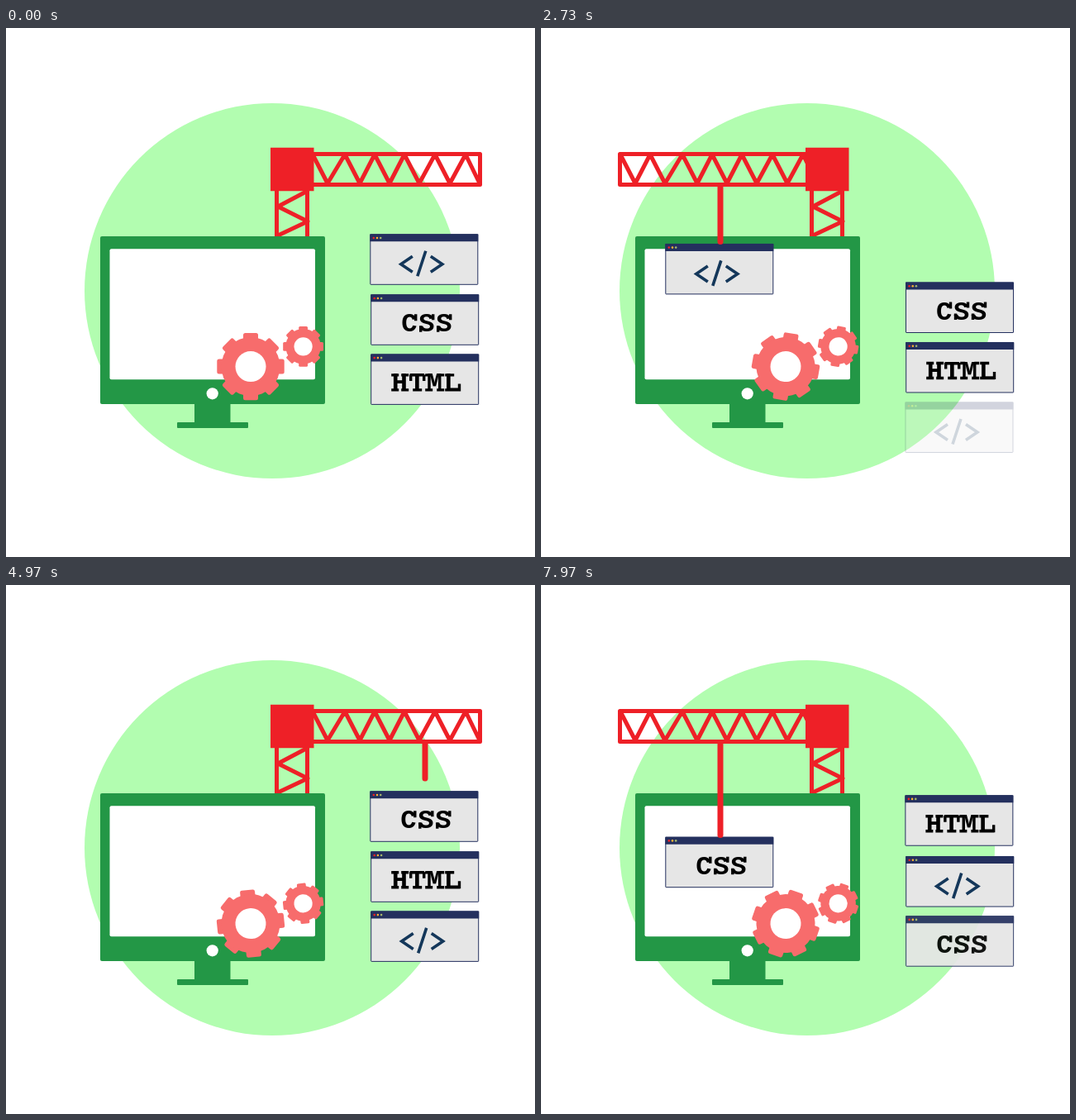
Recreate the animation shown at these times as an HTML page. Size 640 px wide and 640 px high, loop 8 s.

```html
<!DOCTYPE html>
<html lang="en">
<head>
<meta charset="utf-8">
<title>Website under construction</title>
<style>
  html, body { margin: 0; width: 100%; height: 100%; overflow: hidden; background: #fff; }
  svg { display: block; width: 100%; height: 100%; }
  text { font: bold 32px "Liberation Mono", monospace; letter-spacing: 1.8px; }
  .red { fill: none; stroke: #ee2027; stroke-width: 5; stroke-linejoin: round; }
  .serif { fill: none; stroke: #000; stroke-width: 3.4; }
</style>
</head>
<body>
<svg viewBox="0 0 640 640">
  <defs>
    <g id="window">
      <rect x=".5" y=".5" width="130" height="60.5" rx=".5" fill="#e6e6e6" stroke="#24305e"/>
      <path d="M0 0H131V9H0Z" fill="#24305e"/>
      <circle cx="4.5" cy="4.7" r="1.3" fill="#ee2027"/>
      <circle cx="8.7" cy="4.7" r="1.3" fill="#f9b233"/>
      <circle cx="12.9" cy="4.7" r="1.3" fill="#a5b86c"/>
    </g>
    <g id="code">
      <use href="#window"/>
      <path d="M51.5 27L37.5 36.5L51.5 46M67.5 20.5L57.5 51M73.5 27L87.5 36.5L73.5 46"
            fill="none" stroke="#14375a" stroke-width="3.6"/>
    </g>
    <g id="css">
      <use href="#window"/>
      <text x="37" y="45">CSS</text>
      <path class="serif" d="M54.5 24V32M75.5 24V31M60.5 38V45.5M96.5 24V31M81.5 38V45.5"/>
    </g>
    <g id="html">
      <use href="#window"/>
      <text x="25.5" y="45">HTML</text>
      <path class="serif" d="M25 25.5H34M37 25.5H46M25 43.5H34M37 43.5H46
        M48.5 25V32.5M64.5 25V32.5M51 43.5H62
        M66 25.5H72M83 25.5H89M66 43.5H75M80 43.5H89
        M90 25.5H101M90 43.5H108M107.3 36V45"/>
    </g>
    <g id="gear">
      <g id="teeth" fill="#f76c6c"></g>
      <circle r="35.5" fill="#f76c6c"/>
      <circle r="18.5" fill="#fff"/>
    </g>
  </defs>

  <circle cx="322" cy="318" r="227" fill="#b2fdb0"/>

  <path class="red" d="M327.5 195V252M364.5 195V252M365 197L329 216L365 234L329 251"/>
  <g id="jib" class="red"><path d="M334.5 152.5H573.5V189.5H334.5Z"/><path id="lattice"/></g>
  <path d="M320 144.7H372.5V197.2H320Z" fill="#ee2027"/>

  <g fill="#239746">
    <rect x="114" y="252" width="272" height="203" rx="2"/>
    <path d="M228 454H271.5V478H228Z"/>
    <rect x="207" y="477" width="86" height="7" rx="1"/>
  </g>
  <rect x="125.5" y="267.3" width="248.5" height="158" rx="2" fill="#fff"/>
  <circle cx="249.7" cy="442.3" r="7.1" fill="#fff"/>

  <g id="queue"><use/><use/><use/></g>
  <use id="carried"/>
  <line id="rope" class="red" y1="190.5" style="stroke-width:7;stroke-linecap:round"/>
  <use id="bigGear" href="#gear"/>
  <use id="smallGear" href="#gear"/>
</svg>
<script>
const LOOP = 8000, CYCLE = 4520, STEP = 40, GEAR_TURN = 6760;
const JIB_TRAVEL = 239, TROLLEY_TRAVEL = 51, HOOK_X = 507, JIB_Y = 190;
const CARDS = ['#code', '#css', '#html'];
const SLOTS = [[440.3, 248.3], [441.2, 322.3], [441.2, 394.4], [440.3, 467]];
const LOWERING = [63, 61.3];

const $ = id => document.getElementById(id);
const lerp = (a, b, p) => a + (b - a) * p;
const progress = (t, from, to) => Math.min(1, Math.max(0, (t - from) / (to - from)));
const queue = [...$('queue').children];

function place(node, x, y, opacity = 1) {
  node.setAttribute('transform', `translate(${x} ${y})`);
  node.setAttribute('opacity', opacity);
}

const joints = [335, 353, 371, 389, 410, 428, 446, 464, 482, 500, 519, 537, 556, 573];
$('lattice').setAttribute('d', 'M' + joints.map((x, i) => `${x} ${i % 2 ? 188 : 153}`).join('L'));
$('teeth').innerHTML = [0, 45, 90, 135].map(a =>
  `<rect x="-9" y="-40.7" width="18" height="81.4" rx="2.5" transform="rotate(${a})"/>`).join('');

function draw(time) {
  const now = Math.floor((time + 10) / STEP) * STEP;
  const cycle = Math.floor(now / CYCLE), t = now % CYCLE;

  const reach = progress(t, 0, 560);
  const swing = progress(t, 560, 2000);
  const trolley = progress(t, 2000, 2480);
  const lower = progress(t, 2520, 3520);
  const back = progress(t, 3520, 4520);

  const [homeX, homeY] = SLOTS[0];
  const shift = -JIB_TRAVEL * swing - TROLLEY_TRAVEL * trolley;
  const cardY = homeY + LOWERING[cycle] * lower + (t < 560 ? 1 : 0);

  $('jib').setAttribute('transform', `translate(${-JIB_TRAVEL * swing * (1 - back)} 0)`);
  $('carried').setAttribute('href', CARDS[cycle % 3]);
  place($('carried'), homeX + shift, cardY, 1 - back);

  const ropeEnd = lerp(lerp(JIB_Y, cardY + 1.2, reach), JIB_Y, back);
  const ropeX = HOOK_X + shift * (1 - back);
  const rope = $('rope');
  rope.setAttribute('x1', ropeX);
  rope.setAttribute('x2', ropeX);
  rope.setAttribute('y2', Math.max(190.5, ropeEnd - 3.5));
  rope.setAttribute('visibility', ropeEnd > 192 ? 'visible' : 'hidden');

  // Waiting cards climb one slot; the last one fades in from below.
  queue.forEach((node, i) => {
    const [from, to] = [SLOTS[i + 1], SLOTS[i]];
    node.setAttribute('href', CARDS[(cycle + 1 + i) % 3]);
    place(node, lerp(from[0], to[0], lower), lerp(from[1], to[1], lower), i === 2 ? lower : 1);
  });

  const angle = 360 * now / GEAR_TURN;
  $('bigGear').setAttribute('transform', `translate(296 409.6) rotate(${angle})`);
  $('smallGear').setAttribute('transform', `translate(359.6 385.3) rotate(${angle}) scale(.6)`);
}

function tick() {
  draw(performance.now() % LOOP);
  requestAnimationFrame(tick);
}
tick();
</script>
</body>
</html>
```
